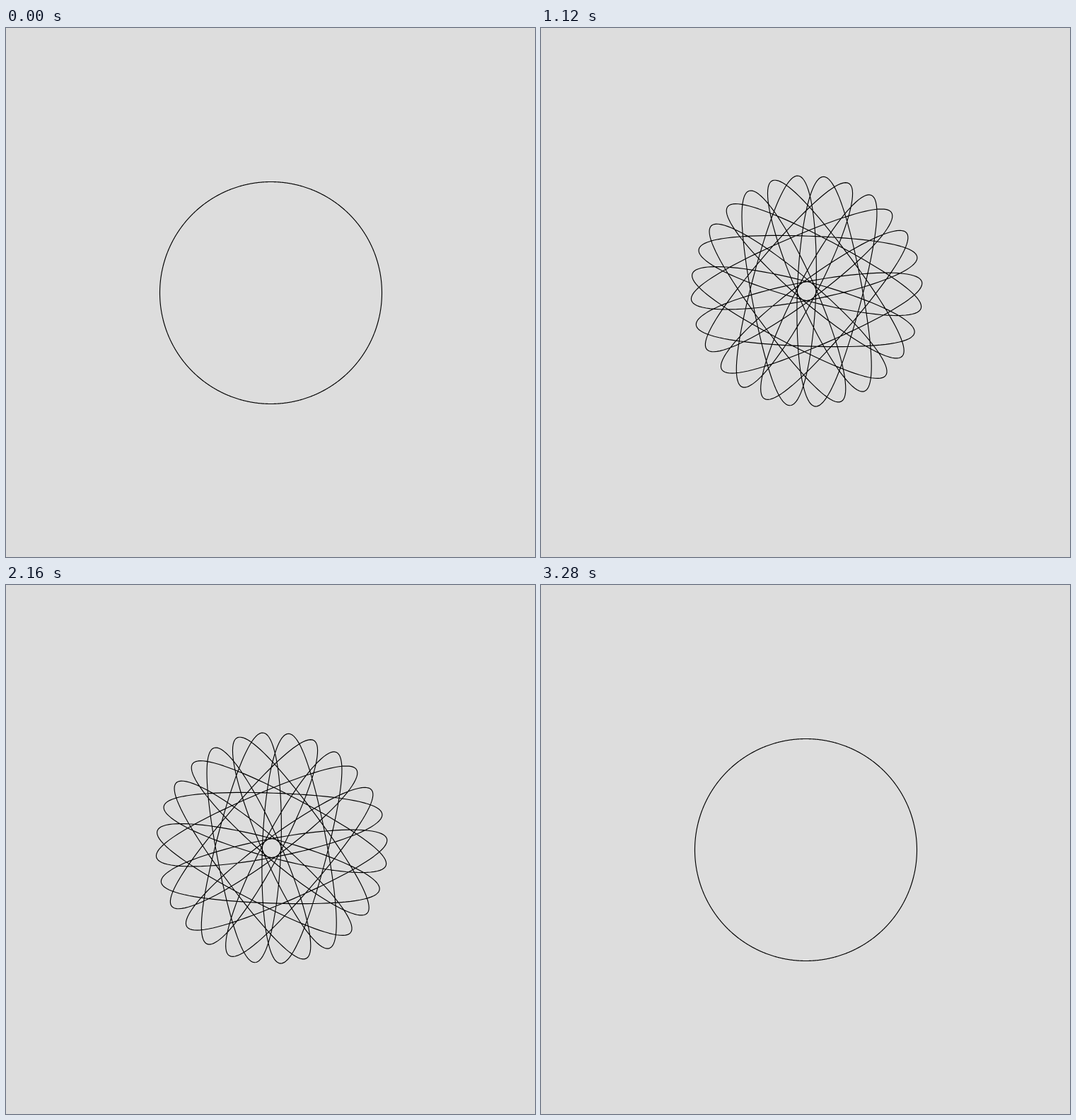
An HTML page that plays this animation: 748x748 px, repeating every 3320 ms.

```html
<!DOCTYPE html>
<html lang="en">
<head>
<meta charset="utf-8">
<title>Rosette</title>
<style>
  html, body { margin: 0; width: 100%; height: 100%; overflow: hidden; background: #ddd; }
  svg { display: block; width: 100%; height: 100%; }
  path { fill: none; stroke: #000; stroke-width: 1.15; stroke-linejoin: round; }
</style>
</head>
<body>
<svg viewBox="0 0 748 748"><path id="curve"/></svg>
<script>
const STEP = 40, STEPS = 83, MID = 41;
const LOOPS = 14, SAMPLES = 90;

// ring: radius of the base circle; a, b: half axes of each loop;
// lift: outward bend of the loop's tips; turn in degrees
const poses = [
  { at: 0,  ring: 157,  a: 0,     b: 0,    lift: 0,   turn: 0,   x: 374.5, y: 374.5 },
  { at: 20, ring: 38.5, a: 159.6, b: 45.5, lift: 2.7, turn: 0,   x: 376.2, y: 372.6 },
  { at: 41, ring: 19.1, a: 159.2, b: 45.6, lift: 2.7, turn: 6.4, x: 374.4, y: 370.8 }
];

const curve = document.getElementById('curve');
const ease = p => (1 - Math.cos(Math.PI * p)) / 2;

function poseAt(step) {
  const i = step < poses[1].at ? 0 : 1;
  const from = poses[i], to = poses[i + 1];
  const p = ease((step - from.at) / (to.at - from.at));
  const pose = {};
  for (const key in from) pose[key] = from[key] + (to[key] - from[key]) * p;
  return pose;
}

// An offset, slightly bent ellipse that turns back by one loop's share on every lap
function outline({ ring, a, b, lift, turn, x, y }) {
  const points = [];
  for (let i = 0; i < LOOPS * SAMPLES; i++) {
    const t = i / SAMPLES * 2 * Math.PI;
    const u = a * Math.sin(t);
    const v = -ring - b * Math.cos(t) - lift * Math.sin(t) ** 2;
    const r = turn * Math.PI / 180 - t / LOOPS;
    const c = Math.cos(r), s = Math.sin(r);
    points.push((x + u * c - v * s).toFixed(2) + ' ' + (y + u * s + v * c).toFixed(2));
  }
  return 'M' + points.join('L') + 'Z';
}

let start = null, shown = -1;

function draw(now) {
  if (start === null) start = now;
  const n = Math.floor((now - start) / STEP) % STEPS;
  const step = MID - Math.abs(n - MID);
  if (step !== shown) {
    curve.setAttribute('d', outline(poseAt(step)));
    shown = step;
  }
  requestAnimationFrame(draw);
}

curve.setAttribute('d', outline(poseAt(0)));
requestAnimationFrame(draw);
</script>
</body>
</html>
```
